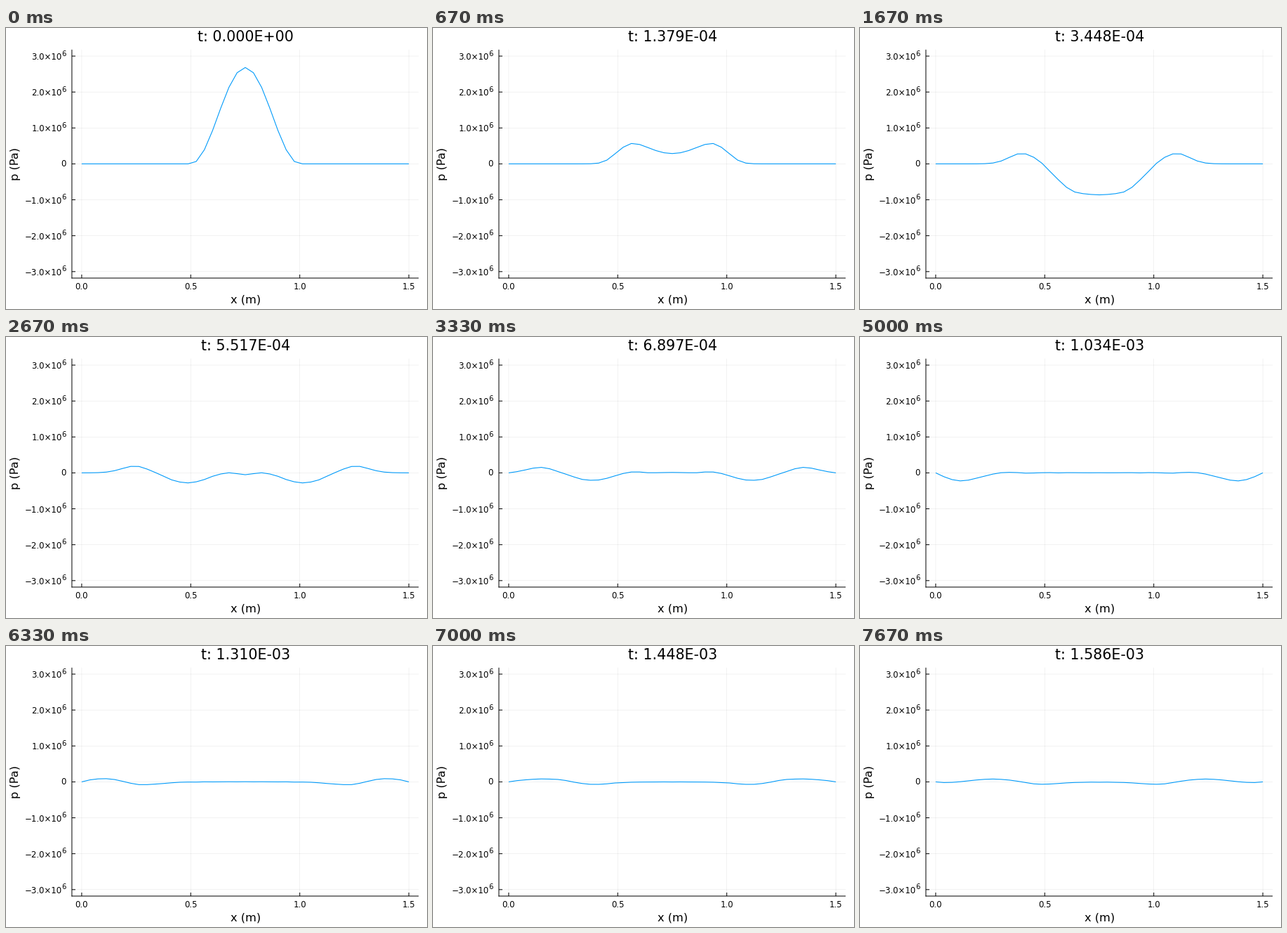
Animation, 600 px wide and 400 px high, one loop 8 s. Source, as a matplotlib script:

```python
import numpy as np
import matplotlib.pyplot as plt
from matplotlib.animation import FuncAnimation

WIDTH, HEIGHT, DPI = 600, 400, 100
TICK_MS, LOOP_MS = 20, 8000
STATES = 24
TIME_STEP = 2e-3 / 29

# Pressure pulse in a cube with p = 0 on the walls, on a coarse grid
LENGTH, CELLS = 1.5, 40
SPEED, PEAK = 724.0, 2.683e6
DX = LENGTH / CELLS
x = np.linspace(0, LENGTH, CELLS + 1)
pulse = np.where(abs(x - LENGTH / 2) < 0.25, np.cos(2 * np.pi * (x - LENGTH / 2)) ** 2, 0)

modes = np.arange(1, CELLS, 2)
shapes = np.sin(np.pi * np.outer(modes, x) / LENGTH)
weights = 2 / CELLS * shapes @ pulse
centre = weights * shapes[:, CELLS // 2]
stiffness = (2 / DX * np.sin(np.pi * modes / (2 * CELLS))) ** 2
omega = SPEED * np.sqrt(stiffness[:, None, None] + stiffness[:, None] + stiffness)


def pressure(t):
    amplitude = np.einsum("lmn,m,n->l", np.cos(omega * t), centre, centre)
    return PEAK * (weights * amplitude) @ shapes


def to_px(position):
    return 107.9 + 310.8 * position


def to_py(value):
    return 193.4 - 51.13e-6 * value


plt.rcParams["font.family"] = "DejaVu Sans"
fig = plt.figure(figsize=(WIDTH / DPI, HEIGHT / DPI), dpi=DPI, facecolor="white")
ax = fig.add_axes([0, 0, 1, 1])
ax.set(xlim=(0, WIDTH), ylim=(HEIGHT, 0))
ax.axis("off")

LEFT, RIGHT = to_px(-0.045), to_px(1.545)
TOP, BOTTOM = to_py(3.18e6), to_py(-3.18e6)


def line(xs, ys, width=1.0, **style):
    style = {"color": "black", "solid_capstyle": "butt", "snap": False} | style
    return ax.plot(xs, ys, lw=width * 72 / DPI, **style)[0]


def label(px, py, text, size, **style):
    style = {"ha": "center", "va": "baseline"} | style
    return ax.text(px, py, text, fontsize=size * 72 / DPI, **style)


for tick in (0, 0.5, 1, 1.5):
    px = to_px(tick)
    line([px, px], [TOP, BOTTOM], 0.5, alpha=0.1)
    line([px, px], [BOTTOM, BOTTOM - 5])
    label(px, 371.8, f"{tick:.1f}", 11.8)

for tick in range(-3, 4):
    py = to_py(tick * 1e6)
    line([LEFT, RIGHT], [py, py], 0.5, alpha=0.1)
    line([LEFT, LEFT + 5], [py, py])
    if tick == 0:
        label(86, py + 4, "0", 11.7, ha="right")
    else:
        label(79.8, py + 5.2, f"{tick:.1f}×10".replace("-", "−"), 11.7, ha="right")
        label(86, py - 0.3, "6", 10, ha="right")

line([LEFT, LEFT], [TOP, BOTTOM + 0.5])
line([LEFT - 0.5, RIGHT], [BOTTOM, BOTTOM])
label(341.5, 391.7, "x (m)", 16.2)
label(20.7, 193.4, "p (Pa)", 16.2, rotation=90, ha="right", va="center")

title = label(341.5, 19.2, "", 20.6)
curve = line(to_px(x), to_py(pulse), 1.1, color="#009AFA", solid_joinstyle="round")

curves = [to_py(pressure(state * TIME_STEP)) for state in range(STATES)]


def update(frame):
    # State changes fall on whole hundredths of a second
    state = int((frame * TICK_MS + 14) * STATES / LOOP_MS) % STATES
    title.set_text(f"t: {state * TIME_STEP:.3E}")
    curve.set_ydata(curves[state])
    return title, curve


animation = FuncAnimation(fig, update, frames=LOOP_MS // TICK_MS, interval=TICK_MS,
                          repeat=True, repeat_delay=0)
plt.show()
```
